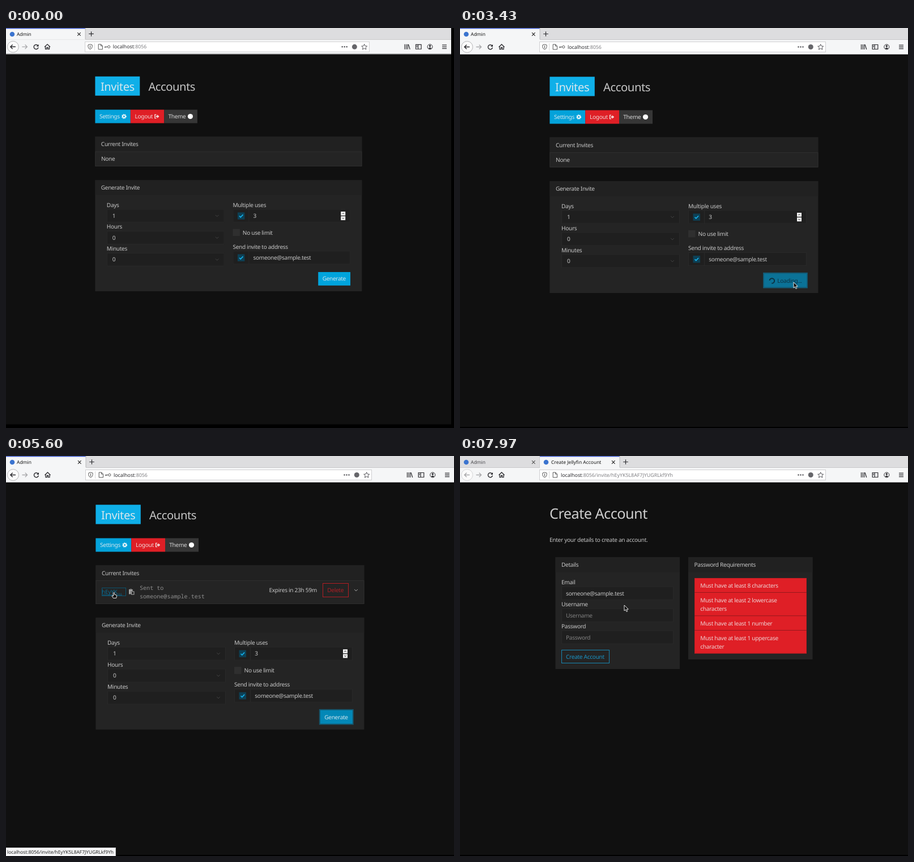
An HTML page with a canvas for the animation above (8 s loop, 791 by 708 pixels).

```html
<!DOCTYPE html>
<html lang="en">
<head>
<meta charset="utf-8">
<title>Invites</title>
<style>
html, body { margin: 0; width: 100%; height: 100%; overflow: hidden; background: #000; }
canvas { display: block; }
</style>
</head>
<body>
<canvas id="stage" width="791" height="708"></canvas>
<script>
const ctx = document.getElementById('stage').getContext('2d');
ctx.textRendering = 'geometricPrecision';
const LOOP = 8000;
const EMAIL = 'someone@sample.test';
const HOST = 'localhost:8056';
const INVITE = '/invite/hEyYK5L8AF7JYUGRLkf9Yh';
const RED = '#df1f26', INK = '#c6c6c6';
const BODY = 10.13, LEFT = 158.4;

// Moments of the story, in ms
const at = { enter: 670, click: 1635, created: 3930, leave: 4110, link: 5070, open: 5580, tab: 5770, away: 6210, swap: 6690 };

const clamp = v => Math.max(0, Math.min(1, v));
const ramp = (t, from, to) => clamp((t - from) / (to - from));
const ease = p => p * p * (3 - 2 * p);
const mix = (a, b, p) => `rgb(${a.map((v, i) => Math.round(v + (b[i] - v) * p))})`;

function box(x, y, w, h, fill, line) {
  if (fill) { ctx.fillStyle = fill; ctx.fillRect(x, y, w, h); }
  if (line) {
    ctx.strokeStyle = line;
    ctx.lineWidth = 1;
    ctx.strokeRect(x + .5, y + .5, w - 1, h - 1);
  }
}

function dot(x, y, r, fill, line, width = 1) {
  ctx.beginPath();
  ctx.arc(x, y, r, 0, Math.PI * 2);
  if (fill) { ctx.fillStyle = fill; ctx.fill(); }
  if (line) { ctx.strokeStyle = line; ctx.lineWidth = width; ctx.stroke(); }
}

// Icon path placed at x, y
function icon(d, x, y, line, width = 1.2, fill) {
  const path = new Path2D(d);
  ctx.save();
  ctx.translate(x, y);
  if (fill) { ctx.fillStyle = fill; ctx.fill(path); }
  if (line) { ctx.strokeStyle = line; ctx.lineWidth = width; ctx.stroke(path); }
  ctx.restore();
}

// Text centred vertically on its capitals
function write(s, x, y, size, color, family, track) {
  ctx.font = `${size}px ${family}`;
  ctx.letterSpacing = `${track * size}px`;
  ctx.fillStyle = color;
  ctx.fillText(s, x, y + size * .357);
}
const label = (s, x, y, color = INK) => write(s, x, y, BODY, color, '"Noto Sans", sans-serif', -.031);
const title = (s, x, y, size, color) => write(s, x, y, size, color, '"Noto Sans", sans-serif', -.022);
const chrome = (s, x, y, size, color) => write(s, x, y, size, color, '"Noto Sans", sans-serif', 0);
const mono = (s, x, y) => write(s, x, y, 10.08, '#8e8e8e', '"Noto Sans Mono", monospace', 0);

function card(x, y, w, h, head) {
  box(x, y, w, h, '#242424');
  box(x, y, w, 26.5, '#212121');
  label(head, x + 10.5, y + 13.5);
}

const field = (x, y, w) => box(x, y, w, 24, '#1f1f1f', '#292929');
const chevron = (x, y, color) => icon('M-2.8-1.4L0 1.4L2.8-1.4', x, y, color, 1);

function select(name, value, y) {
  label(name, 179, y);
  field(179, y + 7.5, 209);
  label(value, 189, y + 19.5);
  chevron(375, y + 19.5, '#444');
}

function checkedInput(value, y) {
  field(403, y, 209);
  box(431, y, 1, 24, '#292929');
  box(411.5, y + 6, 12.5, 12.5, '#0d4055');
  icon('M-3.2 0L-1 2.3L3.3-2.3', 417.8, y + 12.3, '#14b0ea', 1.7);
  label(value, 439.3, y + 12);
}

function stepper(x, y) {
  for (const [top, d] of [[0, 'M-1.8.9L0-.9L1.8.9'], [8.3, 'M-1.8-.9L0 .9L1.8-.9']]) {
    box(x, y + top, 8, 7, '#f4f4f4');
    icon(d, x + 4, y + top + 3.5, '#222', 1);
  }
}

function ring(x, y, w, h, alpha) {
  if (alpha <= 0) return;
  ctx.strokeStyle = `rgba(0,150,205,${.5 * alpha})`;
  ctx.lineWidth = 1.9;
  ctx.strokeRect(x - .9, y - .9, w + 1.8, h + 1.8);
}

function submitButton(t, dy) {
  const y = 434.7 + dy;
  if (t >= at.click && t < at.created) {
    const p = ramp(t, at.click, at.click + 200);
    const ink = mix([215, 225, 230], [13, 50, 66], p);
    box(537, y, 75, 24, mix([4, 131, 177], [11, 114, 151], p));
    ring(537, y, 75, 24, p);
    const turn = (t - at.click) / 750 * Math.PI * 2;
    ctx.beginPath();
    ctx.arc(550.8, y + 12.8, 4.3, turn + Math.PI / 4, turn + Math.PI * 1.75);
    ctx.strokeStyle = ink;
    ctx.lineWidth = 2;
    ctx.stroke();
    label('Loading...', 560.3, y + 12.2, ink);
    return;
  }
  const hover = t < at.click ? ramp(t, 1250, 1400) : 0;
  const focus = t >= at.created ? 1 - ramp(t, at.open, at.open + 150) : 0;
  const shade = Math.max(hover, focus);
  box(554.7, y, 57.2, 24, mix([0, 164, 220], [4, 131, 177], shade));
  ring(554.7, y, 57.2, 24, focus);
  label('Generate', 562.2, y + 12, '#d3e6ee');
}

function inviteRow(t) {
  const hovered = t >= at.link && t < at.away;
  const blue = hovered ? '#0b6b91' : '#159bd0';
  box(LEFT, 220, 474, 42, '#242424', '#2e2e2e');
  label('hEyYK…', 169, 240.5, blue);
  box(169, 245.5, 36, 1, blue);
  if (t >= at.open) box(169, 233, 43, 15, null, hovered ? '#0c536e' : '#127fa9');
  box(217, 236, 6.5, 8.5, '#a5a5a5');
  box(218.5, 235, 3.5, 2, '#777');
  box(220.5, 239, 6.5, 7, '#242424');
  box(221, 239.5, 5.5, 6, null, '#b0b0b0');
  mono('Sent to', 236, 233.5);
  mono(EMAIL, 236, 248.5);
  label('Expires in 23h 59m', 464.5, 237);
  box(559, 225, 46, 25, null, '#b31d23');
  label('Delete', 567.2, 237.8, '#ad1e24');
  chevron(618, 237.5, '#b0b0b0');
}

function toolbar() {
  box(LEFT, 86.3, 79.4, 34.2, '#0fafe8');
  title('Invites', 168, 104.5, 20.25, '#d6e6ed');
  title('Accounts', 253, 104.5, 20.25, INK);

  box(LEFT, 145.5, 62.8, 24, '#04a2da');
  label('Settings', 166, 157.7, '#d3e6ee');
  ctx.setLineDash([1.6, 1.4]);
  dot(209.7, 157.5, 3.6, null, '#e8f4f9', 1.6);
  ctx.setLineDash([]);
  dot(209.7, 157.5, 2.4, null, '#e8f4f9', 1.9);

  box(221.2, 145.5, 59.8, 24, RED);
  label('Logout', 229, 157.7, '#f0d5d6');
  icon('M-.6-3.1H-3.2V3.1H-.6', 267.6, 157.5, '#f5dede', 1.2);
  icon('M-1.6-1.1H1V-3.3L4.6 0L1 3.3V1.1H-1.6Z', 267.6, 157.5, null, 1, '#f5dede');

  box(281, 145.5, 59, 24, '#363636');
  label('Theme', 288.3, 157.7, '#d5d5d5');
  dot(327.5, 157.5, 4.6, '#fff');
}

function adminPage(t) {
  const created = t >= at.created;
  const dy = created ? 15.2 : 0;
  toolbar();
  card(LEFT, 193.5, 474, created ? 68.5 : 53, 'Current Invites');
  if (created) inviteRow(t);
  else {
    box(LEFT, 220, 474, 26.5, '#242424', '#2e2e2e');
    label('None', 169, 233);
  }

  ctx.save();
  ctx.translate(0, dy);
  card(LEFT, 271, 474, 198, 'Generate Invite');
  select('Days', '1', 315);
  select('Hours', '0', 354);
  select('Minutes', '0', 393);
  label('Multiple uses', 403, 315);
  checkedInput('3', 322.5);
  stepper(595, 327);
  box(403, 358, 12.5, 12.5, '#2f2f2f');
  label('No use limit', 420.5, 364.3);
  label('Send invite to address', 403, 389.5);
  checkedInput(EMAIL, 397);
  const focus = ramp(t, at.enter, at.enter + 150) * (1 - ramp(t, at.click - 30, at.click + 110));
  ring(431, 397, 181, 24, focus * .7);
  ctx.restore();
  submitButton(t, dy);
}

function accountPage() {
  title('Create Account', 158, 102.2, 25.3, '#cdcdcd');
  label('Enter your details to create an account.', 158, 148.3);

  card(168.5, 179, 219.5, 198, 'Details');
  [['Email', EMAIL, INK], ['Username', 'Username', '#808080'], ['Password', 'Password', '#808080']]
    .forEach(([name, value, color], i) => {
      const y = 223.3 + i * 39;
      label(name, 179, y);
      field(179, y + 7.5, 198);
      label(value, 187, y + 19.7, color);
    });
  box(179, 343, 85, 24, null, '#1787b3');
  label('Create Account', 187, 355, '#1a93c4');

  card(403, 179, 219.5, 181, 'Password Requirements');
  box(414, 216, 198, 133.5, RED, '#c51c22');
  for (const y of [241, 282.3, 308]) box(414, y, 198, 1, '#96181c');
  [[229, 'Must have at least 8 characters'], [255, 'Must have at least 2 lowercase'], [270, 'characters'],
   [296, 'Must have at least 1 number'], [322, 'Must have at least 1 uppercase'], [337, 'character']]
    .forEach(([y, s]) => label(s, 424.3, y, '#eed2d3'));
}

function tab(x, w, text, active, loading, t) {
  ctx.save();
  ctx.beginPath();
  ctx.rect(x, 0, w + 1, 21);
  ctx.clip();
  if (active) {
    box(x, 0, w, 21, '#f5f6f7');
    box(x, 0, w, 1.3, '#3453cf');
  }
  box(x + w - .5, 0, 1, 20, '#b9b9bb');
  if (loading) dot(x + 12 + 3.5 * Math.sin((t - 6420) / 130), 11, 1.6, '#1e83e6');
  else dot(x + 11, 11, 4.3, '#3b74cf');
  chrome(text, x + (x ? 20 : 19), 11, 8.45, active ? '#141414' : loading ? '#66666a' : '#48484c');
  icon('M-2.8-2.8L2.8 2.8M2.8-2.8L-2.8 2.8', x + 129.8, 11, active ? '#222' : '#555', 1.1);
  ctx.restore();
}

function browser(t) {
  const swapped = t >= at.swap;
  const extra = 141 * ease(ramp(t, at.tab, at.tab + 130));
  const dark = '#2c2c30';
  box(0, 0, 791, 21, '#dddddf');
  box(0, 20, 791, 1, '#c8c8ca');
  box(0, 21, 791, 25, '#f5f6f7');
  box(0, 46, 791, .8, '#c9c9cb');
  tab(0, 141, 'Admin', !swapped, false, t);
  if (extra > 0) tab(141, extra, 'Create Jellyfin Account', swapped, !swapped, t);
  icon('M-4.3 0H4.3M0-4.3V4.3', 151.5 + extra, 10.5, dark, 1.2);

  const back = swapped ? '#a9a9ab' : dark;
  dot(12.5, 33.5, 10, '#fbfbfb', swapped ? '#d4d4d6' : '#b4b4b6');
  icon('M4.5 0H-4.5M-.8-3.8L-4.6 0L-.8 3.8', 12.5, 33.5, back, 1.5);
  icon('M-4.5 0H4.5M.8-3.8L4.6 0L.8 3.8', 33, 33.5, '#a9a9ab', 1.3);
  icon('M3.1-2.3A4 4 0 1 0 3.9 1', 53.5, 33.5, dark, 1.4);
  icon('M4.5-4.5V-.5H.5Z', 53.5, 33.5, null, 1, dark);
  icon('M-5 .3L0-4.5L5 .3M-3.5-.7V4.2H-1V1H1V4.2H3.5V-.7', 73.5, 33.5, dark, 1.3);

  box(140, 24, 506, 19, '#fff', '#cfcfd1');
  icon('M0-4.5L3.6-3.4V0Q3.4 3 0 4.6Q-3.4 3-3.6 0V-3.4ZM0-2.5V2.6', 149.5, 33.5, '#555', 1);
  box(157, 27, 1, 13, '#d8d8d8');
  icon('M-3.5-4.5H1L3.8-1.7V4.5H-3.5ZM.8-4.3V-1.5H3.6', 167.7, 33.5, '#555', 1);
  if (!swapped) {
    dot(182.8, 33.5, 2.1, null, '#555');
    icon('M0 0H-5.5M-5 0V1.8M-3 0V1.5', 180.7, 33.5, '#555', 1);
  }
  const urlX = swapped ? 178 : 190;
  chrome(HOST.slice(0, 9), urlX, 33.5, 8.83, '#2a2a2e');
  const hostWidth = ctx.measureText(HOST.slice(0, 9)).width;
  chrome(HOST.slice(9) + (swapped ? INVITE : ''), urlX + hostWidth, 33.5, 8.83, '#808084');

  for (const dx of [-4, 0, 4]) dot(601.5 + dx, 33.5, 1.2, '#55555a');
  dot(619.3, 33.5, 4.5, '#66666a');
  icon('M0-5L1.5-1.7L5-1.4L2.4 1L3.2 4.5L0 2.6L-3.2 4.5L-2.4 1L-5-1.4L-1.5-1.7Z', 636.7, 33.7, '#55555a', 1);
  icon('M-4.5-4.5V4.5M-1.8-4.5V4.5M.8-4.5V4.5M2-4.3L4.8 4.5', 713, 33.5, dark, 1.2);
  icon('M-4.8-4H4.8V4H-4.8ZM-.8-4V4M-3.6-1.8H-2M-3.6 0H-2', 733, 33.5, dark, 1.2);
  dot(753.3, 33.5, 4.5, null, dark);
  dot(753.3, 32, 1.7, dark);
  icon('M-2.8 2.8Q0-.8 2.8 2.8Q0 4.6-2.8 2.8', 753.3, 33.5, null, 1, dark);
  icon('M-4-3.2H4M-4 0H4M-4 3.2H4', 779, 33.5, dark, 1.3);
}

function statusBar(t) {
  const alpha = ramp(t, at.link + 60, at.link + 160) * (1 - ramp(t, 6360, 6512));
  if (!alpha) return;
  ctx.globalAlpha = alpha;
  box(-1, 693, 195, 16, '#f6f6f7', '#c4c4c6');
  chrome(HOST + INVITE, 2, 701.2, 8.38, '#222');
  ctx.globalAlpha = 1;
}

// Pointer stops: time, x, y
const stops = [
  [at.enter, 742, 570], [1400, 589, 450], [at.leave, 589, 450], [4620, 215, 192], [4870, 193, 226],
  [5120, 190, 242], [6140, 190, 242], [6480, 188, 17], [6600, 188, 12], [6740, 188, 12], [7420, 243, 237], [7970, 290, 264]
];

function pointer(t) {
  if (t < at.enter) return;
  let i = stops.findIndex(s => s[0] > t);
  if (i < 0) i = stops.length;
  const a = stops[i - 1], b = stops[i] || a;
  const p = a === b ? 0 : ease(ramp(t, a[0], b[0]));
  const x = a[1] + (b[1] - a[1]) * p, y = a[2] + (b[2] - a[2]) * p;
  if (t >= at.link && t < at.away) {
    icon('M-1 5V0Q0-1.3 1 0V3.2L4.5 4.2Q5.2 4.6 5 6L4.2 9.5H-1.2L-3.6 5.8Q-3 4-1 6Z', x + .5, y, '#e8e8e8', 1, '#111');
  } else {
    icon('M0 0V10L2.4 7.8L4 11.6L5.8 10.8L4.2 7.2H7.3Z', x, y, '#e6e6e6', 1, '#0a0a0a');
  }
}

const start = performance.now();
function draw() {
  const t = Math.max(0, performance.now() - start) % LOOP;
  const scale = 1 - 5 / 791 * (1 - ramp(t, 15, 130));
  ctx.setTransform(1, 0, 0, 1, 0, 0);
  box(0, 0, 791, 708, '#000');
  ctx.setTransform(scale, 0, 0, scale, 0, 0);
  box(0, 0, 791, 706, '#101010');
  if (t < at.swap) adminPage(t);
  else accountPage();
  browser(t);
  statusBar(t);
  pointer(t);
  requestAnimationFrame(draw);
}
draw();
</script>
</body>
</html>
```
